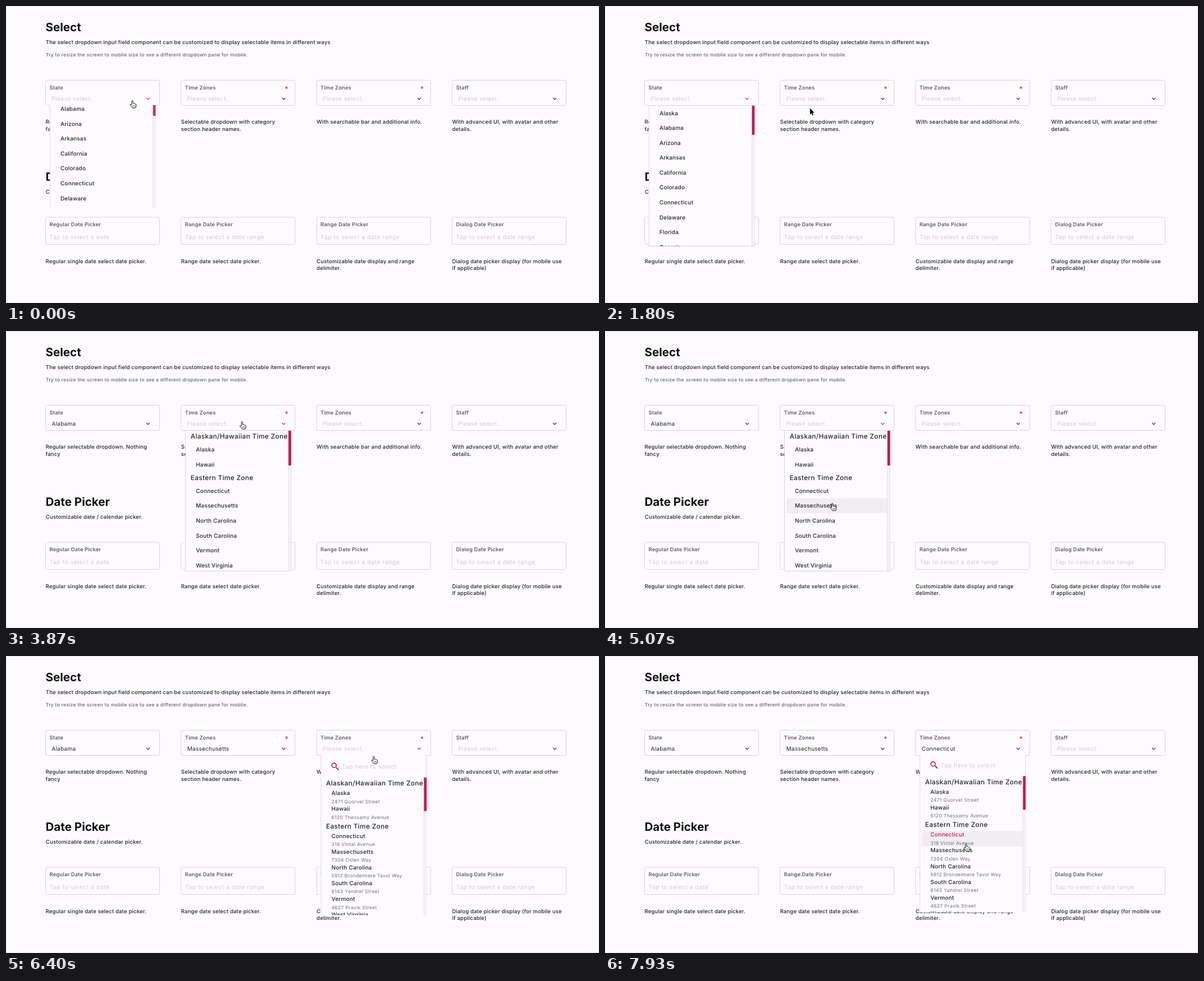
These frames come from a looping animation (1056x530 px, 8 s). An HTML page:

```html
<!DOCTYPE html>
<html lang="en">
<head>
<meta charset="utf-8">
<title>Select and date picker</title>
<style>
  html, body { margin: 0; width: 100%; height: 100%; overflow: hidden; background: #fdfbfe; }
  svg { display: block; }
  text { font-family: Inter, sans-serif; text-rendering: geometricPrecision; white-space: pre; }
</style>
</head>
<body>
<script>
const LOOP = 8000, TOP = 177, PANEL_W = 189, MOVE = 250;
const RED = '#c8194f', INK = '#242326', LINE = '#d6d4d8';
const COLUMNS = [70.5, 311.8, 553.1, 794.4];

// size, weight, letter spacing, colour
const STYLES = {
  title: [20.6, 700, 0, '#111'],
  body: [9.55, 500, .17, INK],
  note: [8.5, 500, .28, '#656368'],
  label: [9.3, 600, .2, '#5f5d61'],
  hint: [10.2, 400, .45, '#cfcdd1'],
  tap: [10.5, 400, .48, '#cfcdd1'],
  value: [10, 400, .24, INK],
  item: [10, 500, .2, INK],
  group: [11.8, 500, .35, INK],
  address: [8.6, 400, .33, '#727075'],
  star: [12, 600, 0, '#d8343c']
};

function add(parent, tag, attrs = {}) {
  const node = document.createElementNS('http://www.w3.org/2000/svg', tag);
  for (const key in attrs) node.setAttribute(key, attrs[key]);
  return parent.appendChild(node);
}

function write(parent, x, middle, string, style) {
  const [size, weight, spacing, fill] = STYLES[style];
  const node = add(parent, 'text', {
    x, y: middle + size * .364, fill,
    'font-size': size, 'font-weight': weight, 'letter-spacing': spacing
  });
  node.textContent = string;
  return node;
}

const rect = (parent, x, y, width, height, fill, more) =>
  add(parent, 'rect', { x, y, width, height, fill, ...more });
const path = (parent, d, stroke, width, more) =>
  add(parent, 'path', { d, stroke, 'stroke-width': width, fill: 'none', ...more });

const stage = add(document.body, 'svg', { width: 1056, height: 530 });
rect(stage, .5, .5, 1055, 529, '#fdfbfe', { stroke: '#e9e7ea' });

write(stage, 70.5, 37.8, 'Select', 'title');
write(stage, 70.8, 65, 'The select dropdown input field component can be customized to display selectable items in different ways', 'body');
write(stage, 70.8, 87.2, 'Try to resize the screen to mobile size to see a different dropdown pane for mobile.', 'note');
write(stage, 70.5, 304.3, 'Date Picker', 'title');
write(stage, 70.8, 331.5, 'Customizable date / calendar picker.', 'body');

function describe(x, y, string) {
  string.split('|').forEach((line, i) => write(stage, x, y + i * 12.2, line, 'body'));
}

function box(x, y, height, label) {
  rect(stage, x, y, 203, height, 'none', { rx: 3, stroke: LINE });
  write(stage, x + 7, y + 13, label, 'label');
}

const fields = [
  ['State', 'Regular selectable dropdown. Nothing|fancy'],
  ['Time Zones', 'Selectable dropdown with category|section header names.'],
  ['Time Zones', 'With searchable bar and additional info.'],
  ['Staff', 'With advanced UI, with avatar and other|details.']
].map(([label, about], i) => {
  const x = COLUMNS[i];
  box(x, 132.5, 45, label);
  if (label == 'Time Zones') write(stage, x + 184.5, 147.6, '*', 'star');
  describe(x, 207, about);
  return {
    hint: write(stage, x + 10.5, 165.5, 'Please select.', 'hint'),
    value: write(stage, x + 11, 165.3, '', 'value'),
    chevron: path(stage, `M${x + 179.8} 163.9l2.9 2.9 2.9-2.9`, INK, 1.2)
  };
});

[
  ['Regular', 'date', 'Regular single date select date picker.'],
  ['Range', 'date range', 'Range date select date picker.'],
  ['Range', 'date range', 'Customizable date display and range|delimiter.'],
  ['Dialog', 'date range', 'Dialog date picker display (for mobile use|if applicable)']
].forEach(([kind, what, about], i) => {
  const x = COLUMNS[i];
  box(x, 377, 48.5, kind + ' Date Picker');
  write(stage, x + 7, 411.7, 'Tap to select a ' + what, 'tap');
  describe(x, 455.2, about);
});

function makePanel(column, height, openAt, closeAt, pick, rowHeight, thumbY, thumbHeight) {
  const x = COLUMNS[column] + 7.2;
  const view = add(stage, 'svg', { x, y: TOP, width: PANEL_W, height });
  const body = add(view, 'g');
  rect(body, .5, .5, PANEL_W - 1, height - 1, '#fdfbfe', { stroke: LINE });
  const hover = rect(body, 4, 0, 180, rowHeight, '#f0eef1');
  const tick = path(body, '', '#e3e0e5', 1);
  rect(body, 183.8, thumbY, 4.7, height - thumbY - 1, '#f4f2f5');
  path(body, `M183.8 ${thumbY}V${height}`, '#dedce0', .8);
  const thumb = rect(body, 184, thumbY, 4.8, thumbHeight, RED, { rx: 1 });
  return { column, x, height, openAt, closeAt, pick, rowHeight, view, body, hover, tick, thumb, rows: [] };
}

function addRow(panel, y, name, address) {
  const text = write(panel.body, 19.2, address ? y - 7.2 : y, name, 'item');
  if (address) write(panel.body, 19.2, y + 7.5, address, 'address');
  panel.rows.push({ y, name, text });
}

const states = makePanel(0, 252, -119, 2724, 'Alabama', 26.57, 1, 52);
['Alaska', 'Alabama', 'Arizona', 'Arkansas', 'California', 'Colorado', 'Connecticut', 'Delaware', 'Florida', 'Georgia']
  .forEach((name, i) => addRow(states, 14 + i * 26.57, name));

const pacific = ['Alaska', 'Hawaii'];
const eastern = ['Connecticut', 'Massechusetts', 'North Carolina', 'South Carolina', 'Vermont', 'West Virginia'];

function addZones(panel, heads, starts, pitch, addresses = []) {
  write(panel.body, 9.7, heads[0], 'Alaskan/Hawaiian Time Zone', 'group');
  write(panel.body, 9.7, heads[1], 'Eastern Time Zone', 'group');
  pacific.forEach((name, i) => addRow(panel, starts[0] + i * pitch, name, addresses[i]));
  eastern.forEach((name, i) => addRow(panel, starts[1] + i * pitch, name, addresses[i + 2]));
}

const zones = makePanel(1, 252, 3600, 5250, 'Massechusetts', 26.57, 1, 62);
addZones(zones, [11, 84.6], [34.6, 108.2], 26.57);

const search = makePanel(2, 297, 6200, 7872, 'Connecticut', 28.1, 45.5, 60);
addZones(search, [55.7, 132.4], [80.6, 157.2], 28.1, [
  '2471 Quorvel Street', '6120 Thessamy Avenue', '318 Vintal Avenue', '7304 Oslen Way',
  '5912 Brondelmere Tavol Way', '8143 Yandrel Street', '4627 Pravik Street', '1508 Zelmont Road'
]);
write(search.body, 37.8, 26.2, 'Tap here to select', 'tap');
path(search.body, 'M27.6 27.6l4.3 4.3', RED, 2);
add(search.body, 'circle', { cx: 23.9, cy: 23.9, r: 4, fill: 'none', stroke: RED, 'stroke-width': 1.7 });

const panels = [states, zones, search];

const arrow = add(stage, 'path', {
  d: 'M0 0V11.2L2.6 8.8 4.4 12.8 6.2 12 4.5 8.1H8Z',
  fill: '#000', stroke: '#fff', 'stroke-width': .9, 'paint-order': 'stroke'
});
const hand = add(stage, 'g');
path(hand, 'M-1.2 7.6V1.2a1.1 1.1 0 0 1 2.2 0V4.9q1.8-.6 2.1.6 1.7-.5 2 .7 1.6-.1 1.6 1.2v2.3q0 1.6-1 3.3H.2Q-1.3 10.7-3.6 8.3q-.9-1.6.6-1.7.9.1 1.8 1Z',
  '#111', 1, { fill: '#fff', 'stroke-linejoin': 'round' });
path(hand, 'M.9 8.4v2.6M2.7 8.4v2.6M4.5 8.4v2.6', '#111', .7);

// time, x, y of the pointer's tip
const ROUTE = [
  [0, 225, 168.8], [400, 222, 171], [600, 222, 171], [900, 214, 250], [1150, 217, 353],
  [1470, 232, 270], [1780, 365, 182.5], [1900, 365, 182.5], [2270, 231, 215], [2600, 235.5, 211],
  [2850, 235.5, 211], [3130, 421, 167], [3330, 420.5, 162], [3950, 420.5, 162], [4400, 412, 250],
  [4850, 405, 307], [5250, 405, 308], [5560, 651, 169], [5670, 655, 175.8], [6380, 655, 178],
  [6800, 635.2, 332.5], [6930, 642, 336], [7200, 642, 336], [7850, 643, 335.2], [LOOP, 643, 335.2]
];

function pointerAt(t) {
  const i = ROUTE.findIndex(stop => stop[0] > t);
  const [t0, x0, y0] = ROUTE[i - 1], [t1, x1, y1] = ROUTE[i];
  const p = (t - t0) / (t1 - t0), e = p * p * (3 - 2 * p);
  return [x0 + (x1 - x0) * e, y0 + (y1 - y0) * e];
}

const unit = v => Math.min(1, Math.max(0, v));
const show = (node, on) => node.setAttribute('visibility', on ? 'visible' : 'hidden');

function drawPanel(panel, t, x, y) {
  const picked = t >= panel.closeAt;
  const p = unit((t - (picked ? panel.closeAt : panel.openAt)) / MOVE);
  const factor = picked ? 1 - p * p : 1 - (1 - p) ** 2;
  const shift = -panel.height * (1 - factor) / 2;
  panel.view.setAttribute('height', panel.height * factor);
  panel.view.setAttribute('display', factor > 0 ? 'inline' : 'none');
  panel.body.setAttribute('transform', `translate(0 ${shift})`);
  panel.thumb.setAttribute('opacity', picked ? 1 : .6 + .4 * factor);

  const inside = factor > 0 && x > panel.x && x < panel.x + PANEL_W && y > TOP && y < TOP + panel.height * factor;
  const chosen = panel.rows.find(row => row.name == panel.pick);
  const under = panel.rows.find(row => Math.abs(y - TOP - shift - row.y) < panel.rowHeight / 2);
  const lit = picked ? chosen : inside && under;
  show(panel.hover, lit);
  if (lit) panel.hover.setAttribute('y', lit.y - panel.rowHeight / 2);
  show(panel.tick, picked);
  panel.tick.setAttribute('d', `M9 ${chosen.y}l2 2 4-4.5`);
  chosen.text.setAttribute('fill', picked ? RED : INK);

  const field = fields[panel.column];
  // The searchable list takes a moment to load after the click.
  const active = t >= panel.openAt - (panel == search ? 600 : 0) && !picked;
  field.chevron.setAttribute('stroke', active ? RED : INK);
  field.value.textContent = picked ? panel.pick : '';
  show(field.hint, !picked);
  return inside;
}

function draw(t) {
  const [x, y] = pointerAt(t);
  const overPanel = panels.map(panel => drawPanel(panel, t, x, y)).some(Boolean);
  const loading = t > 5600 && t < 6380;
  const overField = !loading && y > 132 && y < TOP && COLUMNS.some(left => x > left && x < left + 203);
  const pointing = overPanel && !loading || overField;
  for (const node of [arrow, hand]) node.setAttribute('transform', `translate(${x} ${y})`);
  show(hand, pointing);
  show(arrow, !pointing);
}

const start = performance.now();
function tick() {
  draw((performance.now() - start) % LOOP);
  requestAnimationFrame(tick);
}
tick();
</script>
</body>
</html>
```
